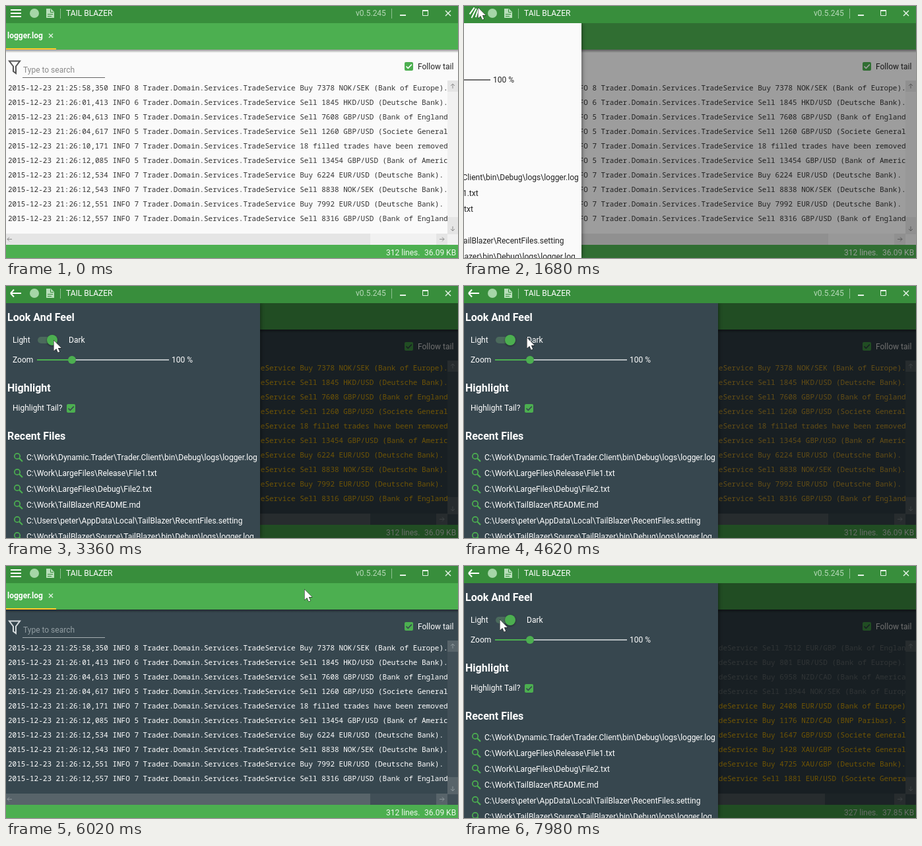
Animation, 685 px wide and 382 px high, one loop 8 s. Source, as an HTML page with a canvas:

```html
<!DOCTYPE html>
<html lang="en">
<head>
<meta charset="utf-8">
<title>Log viewer</title>
<style>
  html, body { margin: 0; width: 100%; height: 100%; overflow: hidden; }
  canvas { display: block; }
</style>
</head>
<body>
<canvas id="stage" width="685" height="382"></canvas>
<script>
const ctx = document.getElementById('stage').getContext('2d');
const LOOP = 8000, STEP = 70, DRAWER = 385;
const GREEN = '#4caf50', AMBER = [255, 193, 7];
const UI = '12px Roboto, sans-serif';
const BOLD = '700 12px Roboto, sans-serif';
const HEAD = '700 16px Roboto, sans-serif';
const MONO = '11px "Noto Sans Mono", monospace';

const LIGHT = { bg: '#fafafa', text: '#222', hint: '#8a8a8a', icon: '#555', rule: '#666',
  track: '#f1f1f1', thumb: '#e5e5e5', arrow: '#8c8c8c', slider: '#6e6e6e', tick: '#fff' };
const DARK = { bg: '#37474f', text: '#fff', hint: '#929da2', icon: '#d5dadc', rule: '#a5adb1',
  track: '#414f57', thumb: '#58646a', arrow: '#8d979b', slider: '#b4bbbf', tick: '#37474f' };

const LOG = `21:25:58,350 8 Buy 7378 NOK/SEK (Bank of Europe
21:26:01,413 6 Sell 1845 HKD/USD (Deutsche Bank
21:26:04,613 5 Sell 7608 GBP/USD (Bank of England
21:26:04,617 5 Sell 1260 GBP/USD (Societe Generale
21:26:10,171 7 18 filled trades have been removed
21:26:12,085 5 Sell 13454 GBP/USD (Bank of America
21:26:12,534 7 Buy 6224 EUR/USD (Deutsche Bank
21:26:12,543 7 Sell 8838 NOK/SEK (Deutsche Bank
21:26:12,551 7 Buy 7992 EUR/USD (Deutsche Bank
21:26:12,557 7 Sell 8316 GBP/USD (Bank of England
21:26:25,174 12 Buy 3192 EUR/USD (Bank of America
21:26:25,179 12 Buy 4272 NZD/CAD (Societe Generale
21:26:25,185 12 Sell 1078 USD/JPY (BNP Paribas
21:26:25,190 12 Buy 6792 XAU/GBP (Bank of America
21:26:25,194 12 Sell 3696 NZD/CAD (Societe Generale
21:26:25,200 12 Sell 7512 EUR/GBP (Bank of England
21:26:25,205 12 Buy 801 EUR/USD (Bank of Europe
21:26:25,212 12 Buy 6958 NZD/CAD (Bank of America
21:26:25,220 12 Sell 13944 NOK/SEK (Bank of Europe
21:26:27,310 12 Buy 2408 EUR/USD (Bank of Europe
21:26:27,316 12 Buy 1176 NZD/CAD (BNP Paribas
21:26:27,321 12 Buy 1647 GBP/USD (Societe Generale
21:26:27,327 12 Buy 1428 XAU/GBP (Societe Generale
21:26:27,332 12 Buy 4725 XAU/GBP (Deutsche Bank
21:26:27,338 12 Sell 1881 EUR/USD (Societe Generale`.split('\n').map(row => {
  const [time, thread, ...message] = row.split(' ');
  return `2015-12-23 ${time} INFO ${thread} Trader.Domain.Services.TradeService ${message.join(' ')}). Status`
    .slice(0, 101);
});

const FILES = ['Work\\Dynamic.Trader\\Trader.Client\\bin\\Debug\\logs\\logger.log',
  'Work\\LargeFiles\\Release\\File1.txt', 'Work\\LargeFiles\\Debug\\File2.txt',
  'Work\\TailBlazer\\README.md', 'Users\\peter\\AppData\\Local\\TailBlazer\\RecentFiles.setting',
  'Work\\TailBlazer\\Source\\TailBlazer\\bin\\Debug\\logs\\logger.log'];

// Pointer path: time, x, y
const POINTER = [[840, 34, 64], [1260, 21, 2], [2170, 21, 2], [2590, 69, 71], [2730, 76, 84],
  [2800, 76, 84], [2940, 72, 82], [4410, 72, 82], [4620, 95, 78], [4900, 457, 11], [4970, 457, 11],
  [5110, 457, 36], [5950, 457, 36], [6020, 452, 35], [6090, 452, 35], [6860, 10, 12],
  [7490, 10, 12], [7770, 36, 51], [7980, 54, 81]];

const OPEN = 1588, CLOSE = 5300, REOPEN = 7091;
const THEME = 3290, SETTLE = 6020, BATCH1 = 6440, BATCH2 = 7490;

const clamp = p => Math.max(0, Math.min(1, p));
const lerp = (a, b, p) => a + (b - a) * p;
const easeOut = p => Math.sin(clamp(p) * Math.PI / 2);
const mix = (a, b, p) => `rgb(${a.map((v, i) => Math.round(lerp(v, b[i], clamp(p))))})`;

function openness(t, duration) {
  const phase = start => easeOut((t - start) / duration);
  return t < CLOSE ? phase(OPEN) : t < REOPEN ? 1 - phase(CLOSE) : phase(REOPEN);
}

function rect(x, y, w, h, color) {
  ctx.fillStyle = color;
  ctx.fillRect(x, y, w, h);
}

function text(string, x, y, color, font = UI) {
  ctx.font = font;
  ctx.fillStyle = color;
  ctx.fillText(string, x, y);
}

function line(points, color, width = 1, closed = false) {
  ctx.beginPath();
  points.forEach(([x, y]) => ctx.lineTo(x, y));
  if (closed) ctx.closePath();
  ctx.strokeStyle = color;
  ctx.lineWidth = width;
  ctx.stroke();
}

function disc(x, y, r, color) {
  ctx.beginPath();
  ctx.arc(x, y, r, 0, Math.PI * 2);
  ctx.fillStyle = color;
  ctx.fill();
}

function pill(x, y, w, h, r, color) {
  ctx.beginPath();
  ctx.roundRect(x, y, w, h, r);
  ctx.fillStyle = color;
  ctx.fill();
}

function checkbox(x, y, theme) {
  pill(x, y, 13, 13, 2, GREEN);
  line([[x + 2.5, y + 6.5], [x + 5.3, y + 9.3], [x + 10.8, y + 3.6]], theme.tick, 1.6);
}

function arrow(x, y, angle, color) {
  ctx.save();
  ctx.translate(x, y);
  ctx.rotate(angle);
  line([[-3.5, 0], [3.5, 0]], color);
  line([[0.5, -3], [3.5, 0], [0.5, 3]], color);
  ctx.restore();
}

function rowColor(t, index) {
  if (t < THEME) return '#333';
  if (t < SETTLE) return mix(AMBER, [227, 176, 48], (t - THEME) / 630);
  if (t < BATCH1) return '#fff';
  if (t >= BATCH2 && index > 18) return mix(AMBER, AMBER, 0);
  return mix(index > 9 ? AMBER : [255, 255, 255], [110, 119, 123], (t - BATCH1) / 490);
}

function drawLog(t, theme, stats) {
  rect(0, 26, 685, 356, theme.bg);

  const shadow = ctx.createLinearGradient(0, 66, 0, 71);
  shadow.addColorStop(0, 'rgba(0,0,0,.4)');
  shadow.addColorStop(1, 'rgba(0,0,0,0)');
  rect(0, 66, 685, 5, shadow);
  rect(0, 26, 685, 40, GREEN);
  text('logger.log', 2, 49, '#fff', BOLD);
  line([[65, 42], [71, 48]], '#e3f2e4', 1.3);
  line([[71, 42], [65, 48]], '#e3f2e4', 1.3);
  rect(0, 64, 76, 2, '#ffc928');

  line([[5, 83.5], [21, 83.5], [15, 91.5], [15, 102], [11, 99], [11, 91.5]], theme.icon, 2, true);
  text('Type to search', 26, 101, theme.hint);
  rect(25, 108, 125, 1, theme.rule);
  checkbox(604, 85, theme);
  text('Follow tail', 624, 96, theme.text);

  const first = stats.lines - 312;
  for (let i = 0; i < 10; i++)
    text(LOG[first + i], 3, 128 + i * 22, rowColor(t, first + i), MONO);

  rect(669, 113, 16, 249, theme.track);
  rect(669, 113, 16, 17, theme.thumb);
  rect(669, 320, 16, 26, theme.thumb);
  arrow(677, 121.5, -Math.PI / 2, theme.arrow);
  arrow(677, 337.5, Math.PI / 2, theme.arrow);
  rect(0, 345, 669, 17, theme.track);
  rect(0, 345, stats.thumb, 17, theme.thumb);
  rect(652, 345, 17, 17, theme.thumb);
  arrow(5.5, 353.5, Math.PI, theme.arrow);
  arrow(660.5, 353.5, 0, theme.arrow);

  rect(0, 362, 685, 20, GREEN);
  text(`${stats.lines} lines.`, 576, 378, '#eef7ee');
  text(`${stats.size} KB`, 634, 378, '#eef7ee');
}

function drawDrawer(t, theme) {
  const open = openness(t, 300);
  if (open <= 0) return;
  rect(0, 26, 685, 356, `rgba(0,0,0,${0.56 * easeOut(open)})`);

  ctx.save();
  ctx.translate(Math.round(DRAWER * (open - 1)), 0);
  ctx.shadowColor = 'rgba(0,0,0,.6)';
  ctx.shadowBlur = 7;
  rect(0, 26, DRAWER, 356, theme.bg);
  ctx.shadowBlur = 0;

  text('Look And Feel', 2, 53, theme.text, HEAD);
  text('Light', 10, 86, theme.text);
  text('Dark', 95, 86, theme.text);
  const on = easeOut((t - 3080) / 250);
  pill(48, 77, 28, 10, 5, on > 0.5 ? '#4b6a5c' : '#a3a7a8');
  ctx.shadowColor = 'rgba(0,0,0,.45)';
  ctx.shadowBlur = 3;
  ctx.shadowOffsetY = 1;
  disc(lerp(54, 70, on), 82, 8, mix([252, 252, 252], [76, 175, 80], on));
  ctx.shadowColor = 'transparent';

  text('Zoom', 10, 116, theme.text);
  rect(47, 111, 200, 2, theme.slider);
  rect(47, 111, 53, 2, GREEN);
  disc(100, 112, 6, GREEN);
  text('100 %', 251, 116, theme.text);

  text('Highlight', 2, 160, theme.text, HEAD);
  text('Highlight Tail?', 10, 189, theme.text);
  checkbox(92, 179, theme);

  text('Recent Files', 2, 233, theme.text, HEAD);
  FILES.forEach((path, i) => {
    const y = 260 + i * 24;
    ctx.beginPath();
    ctx.arc(17, y - 2, 4.2, 0, Math.PI * 2);
    ctx.strokeStyle = GREEN;
    ctx.lineWidth = 1.7;
    ctx.stroke();
    line([[20, y + 1], [25, y + 6]], GREEN, 2.2);
    text('C:\\' + path, 31, y + 4, theme.text);
  });
  ctx.restore();
}

function drawMenuIcon(m) {
  ctx.save();
  ctx.translate(15, 11);
  ctx.rotate(-Math.PI * m);
  line([[-8, 0], [8, 0]], '#fff', 2);
  for (const side of [-1, 1])
    line([[lerp(-8, 3, m), side * lerp(5, 5.5, m)], [8, side * lerp(5, 0, m)]], '#fff', 2);
  ctx.restore();
}

function drawTitleBar(t) {
  rect(0, 0, 685, 26, '#388e3c');
  drawMenuIcon(openness(t, 400));
  disc(43, 11, 7, '#a5d6a7');
  ctx.beginPath();
  [[61, 4], [68, 4], [73, 9], [73, 18], [61, 18]].forEach(([x, y]) => ctx.lineTo(x, y));
  ctx.fillStyle = '#b9dfbb';
  ctx.fill();
  line([[67.5, 4.5], [67.5, 9.5], [72, 9.5]], '#388e3c');
  rect(63, 12, 8, 1, '#388e3c');
  rect(63, 15, 6, 1, '#388e3c');
  rect(82, 4, 1, 15, '#8cc08f');
  text('TAIL BLAZER', 91, 15, '#fff');
  text('v0.5.245', 530, 15, '#b5d8b7');
  rect(584, 4, 1, 15, '#8cc08f');
  rect(597, 13, 9, 2, '#e6f3e7');
  line([[631.5, 7], [639.5, 7], [639.5, 14.5], [631.5, 14.5]], '#e6f3e7', 1, true);
  rect(631, 6, 9, 2, '#e6f3e7');
  line([[666, 7], [674, 15]], '#e6f3e7', 1.4);
  line([[674, 7], [666, 15]], '#e6f3e7', 1.4);
}

function drawPointer(t) {
  if (t < POINTER[0][0]) return;
  const next = POINTER.findIndex(key => key[0] > t);
  const b = POINTER[next < 0 ? POINTER.length - 1 : next];
  const a = next < 0 ? b : POINTER[next - 1];
  const p = a === b ? 0 : (t - a[0]) / (b[0] - a[0]);
  ctx.save();
  ctx.translate(Math.round(lerp(a[1], b[1], p)) + 0.5, Math.round(lerp(a[2], b[2], p)) + 0.5);
  line([[0, 0], [0, 16], [3.7, 12.6], [6.2, 18.3], [8.8, 17.2], [6.4, 11.6], [11.4, 11.6]], '#000', 1, true);
  ctx.fillStyle = '#fff';
  ctx.fill();
  ctx.restore();
}

function render(now) {
  const t = Math.floor(now % LOOP / STEP) * STEP;
  const theme = t < THEME ? LIGHT : DARK;
  const stats = t < BATCH1 ? { lines: 312, size: '36.09', thumb: 552 }
    : t < BATCH2 ? { lines: 321, size: '37.14', thumb: 556 }
    : { lines: 327, size: '37.85', thumb: 547 };
  drawLog(t, theme, stats);
  drawDrawer(t, theme);
  drawTitleBar(t);
  drawPointer(t);
}

const began = performance.now();
function tick() {
  render(performance.now() - began);
  requestAnimationFrame(tick);
}
tick();
</script>
</body>
</html>
```
